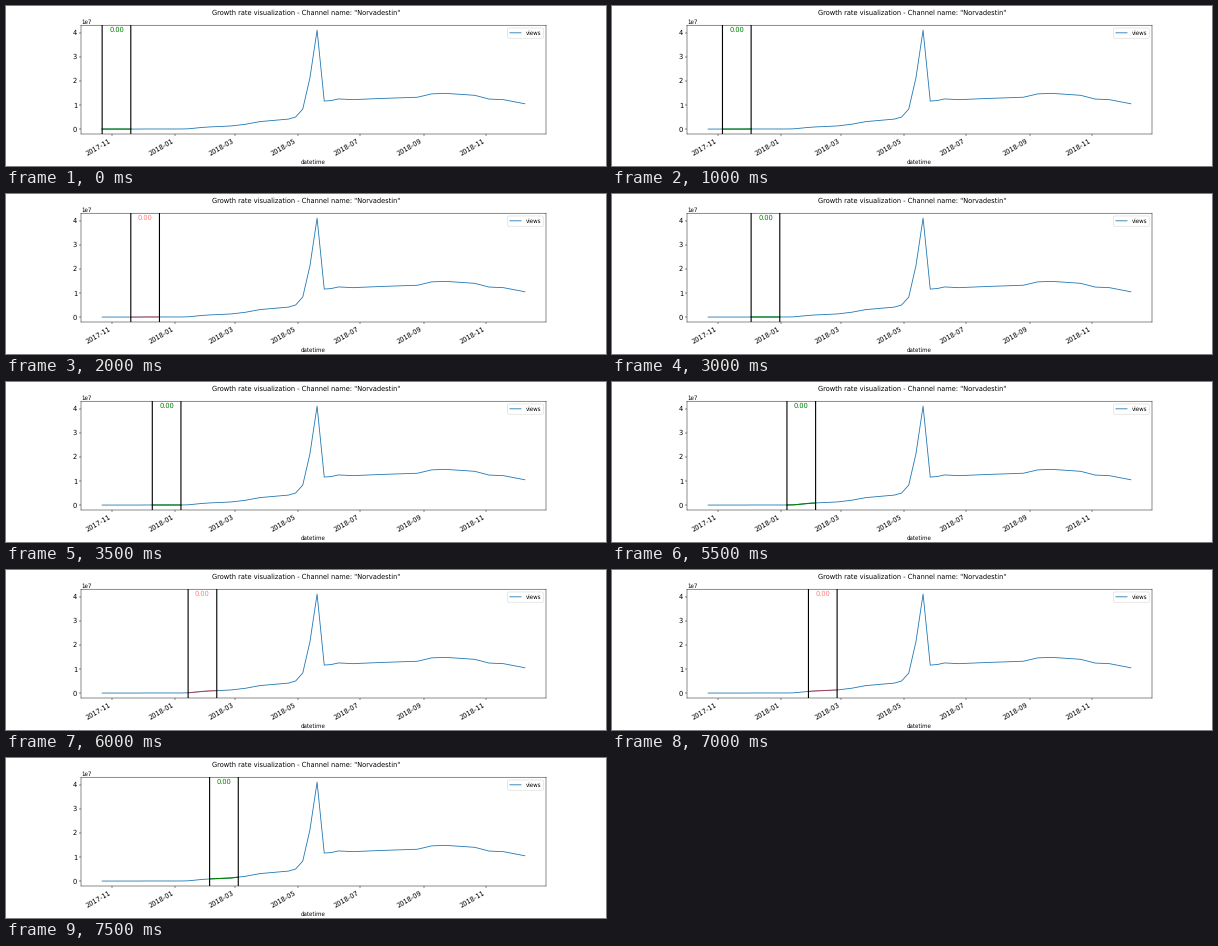
Write a matplotlib script that moves like this. It is 600 px wide and 160 px high and loops after 8 s.

```python
import matplotlib.pyplot as plt
import matplotlib.dates as mdates
import numpy as np
from matplotlib.animation import FuncAnimation

# Keep sub-pixel positions for lines and glyphs at this low resolution
plt.rcParams.update({"text.hinting": "none", "path.snap": False})

FRAMES, INTERVAL = 16, 500
WEEKS = 60
HALF = 2  # half the window width in weeks

# Turning points of the curve: week, views in millions
KEYS = [
    (5, 0.02), (6, 0.05), (11, 0.05), (12, 0.12), (14, 0.7), (15, 0.9),
    (18, 1.3), (20, 2.0), (22, 3.1), (26, 4.15), (27, 5.0), (28, 8.3),
    (29, 21.2), (30, 41.0), (31, 11.6), (32, 11.85), (33, 12.5), (35, 12.2),
    (39, 12.7), (44, 13.2), (46, 14.6), (48, 14.8), (52, 14.0), (54, 12.45),
    (56, 12.2), (59, 10.5),
]
index = np.arange(WEEKS)
views = np.interp(index, *zip(*KEYS)) * 1e6
dates = mdates.date2num(np.datetime64("2017-10-22")) + 7 * index

fig, ax = plt.subplots(figsize=(15, 4), dpi=40)
fig.subplots_adjust(left=0.125, right=0.9, bottom=0.2, top=0.88)
fig.suptitle('Growth rate visualization - Channel name: "Norvadestin"')

ax.plot(dates, views, label="views")
ax.set_xlabel("datetime")
ax.xaxis.set_major_locator(mdates.MonthLocator(bymonth=range(1, 13, 2)))
ax.xaxis.set_major_formatter(mdates.DateFormatter("%Y-%m"))
ax.tick_params(labelsize=12)
plt.setp(ax.get_xticklabels(), rotation=30, ha="right")
ax.legend(loc="upper right")
ax.set_xlim(ax.get_xlim())
ax.set_ylim(ax.get_ylim())

edges = [ax.axvline(dates[0], color="black", lw=2, zorder=4) for _ in range(2)]
segment, = ax.plot([], [], lw=2, zorder=3)
rate = ax.text(dates[0], views.max(), "0.00", size=12, ha="center", va="center")


def slowing(y):
    """True when the second half of the window gains less than the first."""
    return y[-1] - y[HALF] < y[HALF] - y[0]


def update(i):
    window = slice(i, i + 2 * HALF + 1)
    x, y = dates[window], views[window]
    edges[0].set_xdata([x[0]] * 2)
    edges[1].set_xdata([x[-1]] * 2)
    segment.set_data(x, y)
    rate.set_x(x[HALF])
    color, alpha = ("red", 0.5) if slowing(y) else ("green", 1)
    for artist in (segment, rate):
        artist.set(color=color, alpha=alpha)
    return [*edges, segment, rate]


anim = FuncAnimation(fig, update, frames=FRAMES, interval=INTERVAL,
                     repeat=True, repeat_delay=0)
plt.show()
```
